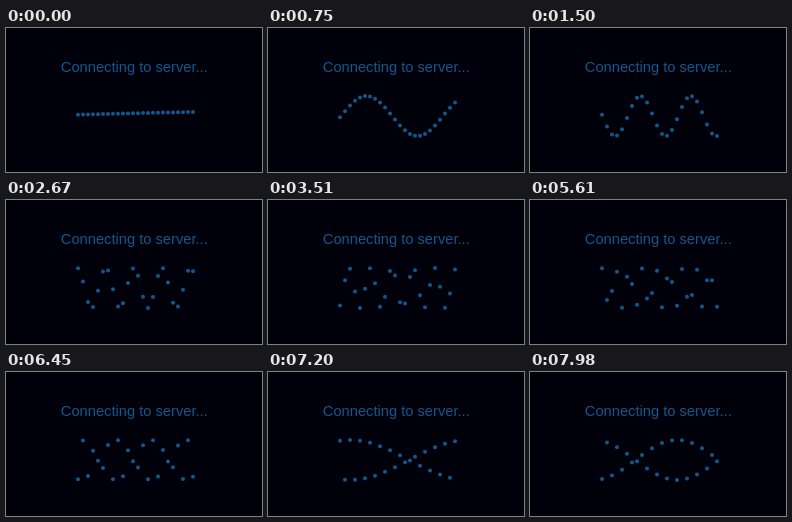
Write an HTML page that moves like this. It is 256 by 144 pixels and loops after 8 s.

```html
<!DOCTYPE html>
<html lang="en">
<head>
<meta charset="utf-8">
<title>Connecting</title>
<style>
  html, body { margin: 0; width: 100%; height: 100%; overflow: hidden; background: #00000a; }
  svg { display: block; width: 256px; height: 144px; fill: #12588c; }
  text { font: 14.7px "Liberation Sans", Arial, sans-serif; }
</style>
</head>
<body>
<svg viewBox="0 0 256 144">
  <text x="54.8" y="44">Connecting to server...</text>
  <g id="dots"></g>
</svg>
<script>
  const LOOP = 8000, STEP = 30, LAG = 15;
  const COUNT = 24, LEFT = 72, GAP = 5, MIDDLE = 88, SWING = 20;
  const group = document.getElementById('dots');

  const dots = Array.from({ length: COUNT }, (_, i) => {
    const dot = document.createElementNS('http://www.w3.org/2000/svg', 'circle');
    dot.setAttribute('cx', LEFT + GAP * i);
    dot.setAttribute('r', 2);
    return group.appendChild(dot);
  });

  // Pendulum wave: dot i swings 10 + i times in 15 seconds.
  function draw(ms) {
    const tick = Math.floor((ms % LOOP) / STEP) * STEP;
    const seconds = (Math.min(tick, LOOP - 35) - LAG) / 1000;
    dots.forEach((dot, i) => {
      const turns = seconds * (10 + i) / 15;
      dot.setAttribute('cy', (MIDDLE + SWING * Math.sin(2 * Math.PI * turns)).toFixed(2));
    });
  }

  const start = performance.now();
  function frame() {
    draw(performance.now() - start);
    requestAnimationFrame(frame);
  }
  frame();
</script>
</body>
</html>
```
